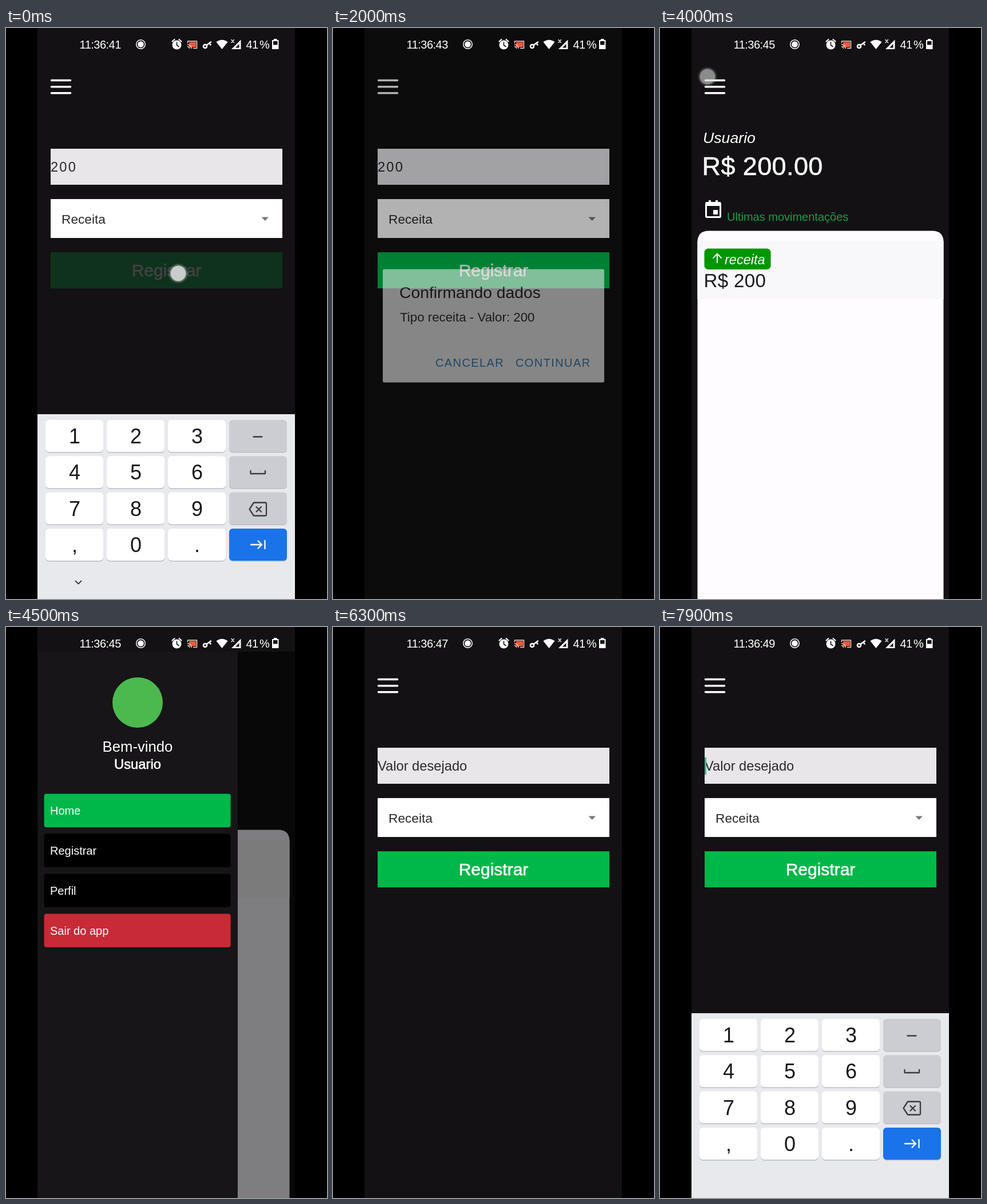
These frames come from a looping animation (561x998 px, 8000 ms). An HTML page:

```html
<!DOCTYPE html>
<html lang="pt">
<head>
<meta charset="utf-8">
<title>Controle de gastos</title>
<style>
html, body { margin: 0; width: 100%; height: 100%; overflow: hidden; background: #000; }
svg { display: block; font-family: "Liberation Sans", Arial, sans-serif; }
text { white-space: pre; }
.mid { text-anchor: middle; }
.medium { stroke: currentColor; stroke-width: .6; }
.line { fill: none; stroke-linecap: round; stroke-linejoin: round; }
</style>
</head>
<body>
<svg width="561" height="998" viewBox="0 0 561 998" color="#fff">
  <defs>
    <clipPath id="phone"><rect x="55" width="450" height="998"/></clipPath>
    <radialGradient id="glow">
      <stop offset=".7" stop-color="#d0d4d2"/>
      <stop offset=".8" stop-color="#b8bcbc" stop-opacity=".4"/>
      <stop offset="1" stop-color="#a0a0a8" stop-opacity="0"/>
    </radialGradient>
  </defs>
  <rect width="561" height="998"/>
  <g clip-path="url(#phone)">
    <rect x="55" width="450" height="998" fill="#131113"/>
    <path class="line" stroke="#fff" stroke-width="3.6" d="M79.5 91.5h33M79.5 102.7h33M79.5 113.8h33"/>

    <g id="form">
      <rect x="78" y="211" width="405" height="63" fill="#e8e6e9"/>
      <text id="amount" x="78" y="251" font-size="23.7" fill="#2b292c"></text>
      <rect id="caret" x="78" y="228" width="3" height="30" fill="#3dba97"/>
      <rect x="78" y="299" width="405" height="68" fill="#fff"/>
      <text x="97" y="341.5" font-size="22.7" fill="#2b292c">Receita</text>
      <path d="M446.5 330.5h12.500l-6.250 6.500z" fill="#777"/>
      <g id="submit">
        <rect x="78" y="392" width="405" height="63" fill="#00b749"/>
        <text class="mid medium" x="280.5" y="434" font-size="30" fill="#fff">Registrar</text>
      </g>
    </g>

    <g id="home" fill="#fff">
      <text x="75" y="201" font-size="26.7" font-style="italic">Usuario</text>
      <text class="medium" x="73.5" y="257" font-size="45" letter-spacing=".4">R$ 200.00</text>
      <path fill-rule="evenodd" d="M82 304h3v-3h4v3h8v-3h4v3h3q3 0 3 3v22q0 3-3 3h-22q-3 0-3-3v-22q0-3 3-3zM82 311v18h22v-18zM93 318h8v8h-8z"/>
      <text x="117" y="337" font-size="20" fill="#1b9d4d">Ultimas movimentações</text>
      <path fill="#fefcff" d="M65.500 998V374.500q0-20 20-20H475.500q20 0 20 20V998z"/>
      <rect x="65.5" y="372" width="430" height="102" fill="#f8f7f9"/>
      <rect x="77.500" y="385.500" width="116" height="36.500" rx="6.500" fill="#009600"/>
      <path class="line" stroke="#fff" stroke-width="2" d="M100 410v-15m-7 7 7-7.500 7 7.500"/>
      <text x="113" y="412.5" font-size="23.5" font-style="italic">receita</text>
      <text x="76.500" y="453" font-size="33.2" letter-spacing=".3" fill="#1d1b1e">R$ 200</text>
    </g>

    <rect id="dim" x="55" width="450" height="998"/>

    <g id="dialog">
      <rect x="87" y="421.5" width="387" height="198" rx="2.5" fill="#fff"/>
      <text x="116" y="472" font-size="28.3" fill="#222">Confirmando dados</text>
      <text x="117" y="513" font-size="22.3" fill="#2b2b2b">Tipo receita - Valor: 200</text>
      <rect id="ripple" x="309" y="560" width="151" height="49" rx="3" fill="#dedede"/>
      <g font-size="20" letter-spacing="1.4" fill="#3a80b8">
        <text x="179" y="592">CANCELAR</text>
        <text x="319" y="592">CONTINUAR</text>
      </g>
    </g>

    <rect id="shade" x="55" y="43" width="450" height="955"/>
    <g id="drawer" fill="#fff">
      <rect x="55" y="43" width="350" height="955" fill="#171517"/>
      <circle cx="230" cy="132" r="44" fill="#4cb94f"/>
      <text class="mid" x="230" y="217.5" font-size="25.7">Bem-vindo</text>
      <text class="mid medium" x="230" y="248" font-size="23.8">Usuario</text>
      <g id="items" font-size="20"></g>
    </g>

    <g id="keyboard">
      <rect x="55" y="675" width="450" height="323" fill="#e8e9ed"/>
      <g id="keys" font-size="36" fill="#18181a"></g>
      <g class="line" stroke="#3a3b40" stroke-width="2.3">
        <path d="M432.500 714.500h15M427.500 774v5h25.500v-5"/>
        <path d="M433 829.500h20q2 0 2 2v19q0 2-2 2h-20l-7.500-11.500zM437.500 837l8.500 8.500m0-8.500-8.500 8.500"/>
        <path stroke="#fff" d="M428 903h19m-6.500-6.500 6.500 6.500-6.500 6.500M452.500 896v14"/>
        <path id="chevron" stroke-width="1.8" d="m121.500 966.500 5 5 5-5"/>
      </g>
    </g>
    <circle id="touch" r="18" fill="url(#glow)"/>
  </g>

  <g fill="#fff" font-size="20">
    <text id="clock" x="128.500" y="36" letter-spacing="-.5"></text>
    <circle cx="235.5" cy="28.5" r="5.3"/>
    <circle cx="235.5" cy="28.5" r="7.8" fill="none" stroke="#fff" stroke-width="1.5"/>
    <circle cx="298.5" cy="29.5" r="8"/>
    <path class="line" stroke="#fff" stroke-width="2.2" d="m290.500 23.500 4-3.500m8 0 4 3.500"/>
    <path class="line" stroke="#131113" stroke-width="1.6" d="M298.500 25v5l3.500 2.500"/>
    <rect x="320" y="24.5" width="12" height="9" fill="#f0583c"/>
    <path class="line" stroke="#e9d5d0" stroke-width="1.5" d="M317.500 26v-3h16v12.500h-6M317.500 29q6 .5 6.500 6.500M317.500 32.500q3 .5 3 3"/>
    <circle cx="348" cy="32" r="3" fill="none" stroke="#fff" stroke-width="2.6"/>
    <path class="line" stroke="#fff" stroke-width="2.6" d="m350.500 30 7.500-5.500m-2.500 2 2 3"/>
    <path d="M367.500 24.500q10-7.500 20 0l-10 12.500z"/>
    <path d="M410.500 20.500V37H394z"/>
    <path d="M407.500 28v6.500h-6.500z" fill="#131113"/>
    <path class="line" stroke="#fff" stroke-width="1.3" d="m394 20.500 4.500 5m0-5-4.500 5"/>
    <text x="419.5" y="36" letter-spacing="-.5">41</text>
    <text x="443" y="36">%</text>
    <path fill-rule="evenodd" d="M468 19h5.500v2h3v16h-11.500v-16h3zM467 23v6.500h7.500v-6.500z"/>
  </g>
</svg>
<script>
const LOOP = 8000, STEP = 100;
const el = id => document.getElementById(id);
const ramp = (t, a, b) => Math.min(1, Math.max(0, (t - a) / (b - a)));
const easeOut = p => 1 - (1 - p) ** 2;
const opacity = (id, value) => el(id).setAttribute('opacity', value);
const move = (id, x, y) => el(id).setAttribute('transform', `translate(${x} ${y})`);

el('keys').innerHTML = ['123 ', '456 ', '789 ', ',0. '].map((row, r) =>
  [...row].map((key, c) => {
    const x = 69 + c * 107, y = 685 + r * 63.3;
    const fill = c < 3 ? '#fff' : r < 3 ? '#cccdd3' : '#1a73e8';
    const box = (dy, color) => `<rect x="${x}" y="${y + dy}" width="101" height="56" rx="6" fill="${color}"/>`;
    return box(1.5, '#bcbdc3') + box(0, fill) +
      `<text class="mid" x="${x + 51}" y="${y + 41}">${key}</text>`;
  }).join('')).join('');

el('items').innerHTML = ['Home', 'Registrar', 'Perfil', 'Sair do app'].map((label, i) =>
  `<rect x="66.6" y="${291.6 + i * 69.9}" width="326" height="58.4" rx="4" fill="${i < 3 ? '#000' : '#c92a37'}"/>
   <text x="77" y="${328 + i * 69.9}">${label}</text>`).join('');
const itemBoxes = el('items').querySelectorAll('rect');

// Taps: start, end, x, y
const FADE = 300;
const taps = [
  [-500, 100, 301, 429],
  [1400, 1500, 404, 587],
  [3800, 3900, 83, 85],
  [5700, 5800, 230, 391],
  [6500, 6600, 240, 243]
];

function draw(t) {
  const home = t >= 2100 && t < 5900;
  const later = t >= 5900;
  const dialog = ramp(t, 200, 500) * (1 - ramp(t, 1900, 2100));
  const drawer = t < 5000 ? easeOut(ramp(t, 4000, 4500)) : 1 - easeOut(ramp(t, 5800, 6200));
  const keyboard = t < 3000 ? 1 - easeOut(ramp(t, 100, 500)) : easeOut(ramp(t, 6700, 7200));

  el('clock').textContent = '11:36:' + (41 + Math.floor((t + 200) / 1000));
  opacity('home', +home);
  opacity('form', +!home);
  el('amount').textContent = later ? 'Valor desejado' : '200';
  el('amount').setAttribute('letter-spacing', later ? 0 : 2.2);
  opacity('caret', +((t >= 6900 && t < 7400) || t >= 7900));
  opacity('submit', 0.2 + 0.8 * ramp(t, 0, 300));

  opacity('dialog', dialog);
  opacity('dim', dialog * 0.6);
  opacity('ripple', t < 1400 ? 0 : 1 - ramp(t, 1500, 1900));
  opacity('shade', drawer * 0.5);
  move('drawer', -350 * (1 - drawer), 0);
  itemBoxes[0].setAttribute('fill', later ? '#000' : '#00b749');
  itemBoxes[1].setAttribute('fill', later ? '#00b749' : '#000');
  move('keyboard', 0, 325 * (1 - keyboard));
  opacity('chevron', +!later);

  const tap = taps.find(([start, end]) => t >= start && t < end + FADE);
  opacity('touch', tap ? 0.95 * (1 - ramp(t, tap[1], tap[1] + FADE)) : 0);
  if (tap) move('touch', tap[2], tap[3]);
}

const begin = performance.now();
function tick() {
  const t = (performance.now() - begin) % LOOP;
  draw(Math.floor(t / STEP) * STEP);
  requestAnimationFrame(tick);
}
tick();
</script>
</body>
</html>
```
